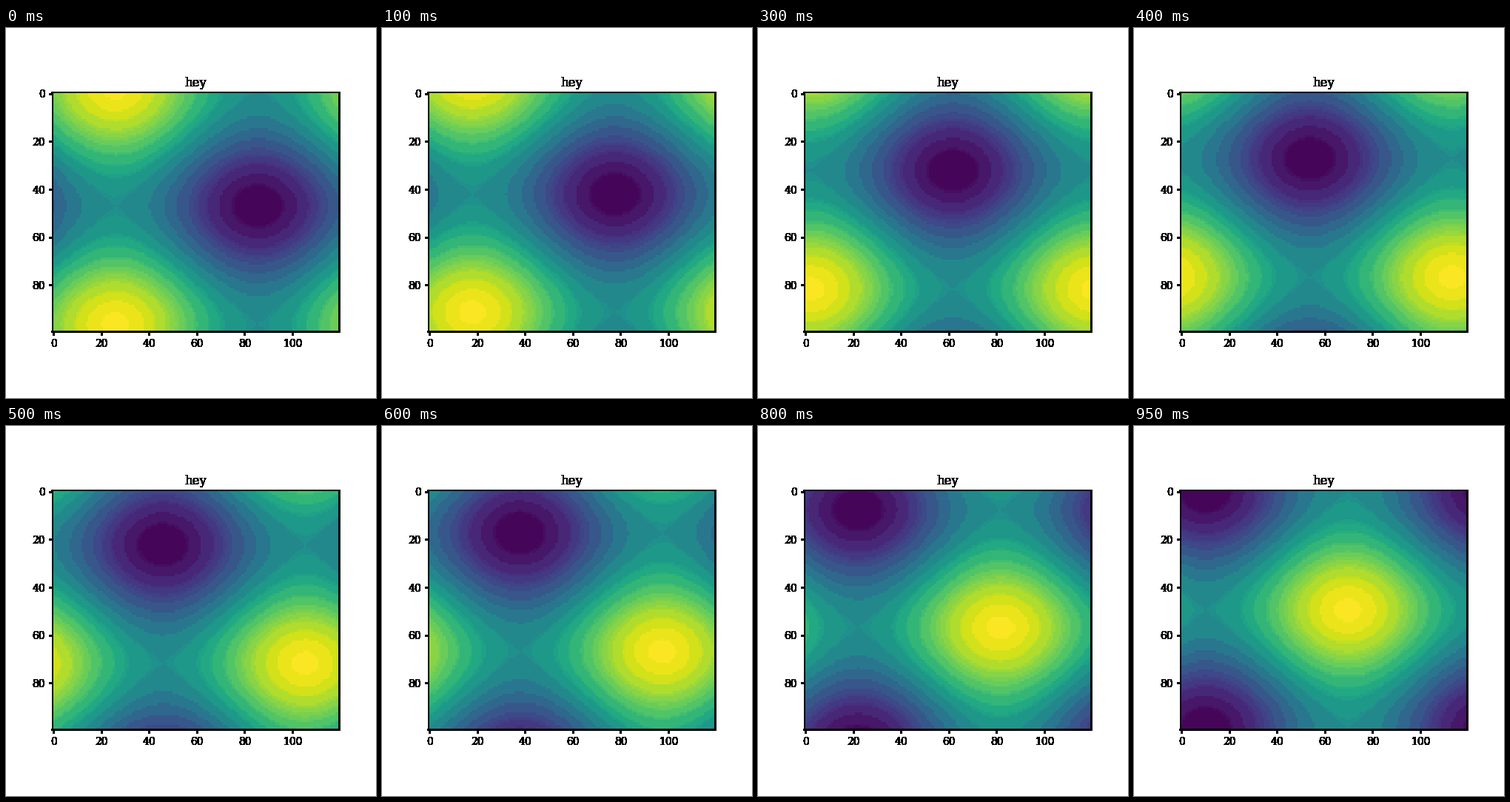
These frames come from a looping animation (500 px wide and 500 px high, 1 s). A matplotlib script:

```python
import matplotlib.pyplot as plt
import numpy as np
from matplotlib.animation import FuncAnimation

FRAMES, INTERVAL = 20, 50
COLS, ROWS = 120, 100
DPI = 100

plt.rcParams.update({"font.family": "DejaVu Serif", "font.size": 10,
                     "text.kerning_factor": 6})

x = np.linspace(0, 2 * np.pi, COLS)
y = np.linspace(0, 2 * np.pi, ROWS)[:, None]

# Group the colormap into coarse RGB cells (3, 4 and 3 bits per channel).
viridis = plt.get_cmap("viridis")(np.arange(256), bytes=True)[:, :3]
_, band = np.unique(viridis >> np.array([5, 4, 5], dtype=np.uint8),
                    axis=0, return_inverse=True)
band = band.ravel()


def wave_image(frame):
    """Travelling wave coloured with the mean colour of each band."""
    step = frame + 1
    z = np.sin(x + step * np.pi / 15) + np.cos(y + step * np.pi / 20)
    level = ((z - z.min()) / np.ptp(z) * 256).astype(int).clip(0, 255)
    count = np.bincount(level.ravel(), minlength=256)
    total = np.maximum(np.bincount(band, count), 1)
    mean = np.stack([np.bincount(band, count * channel) / total
                     for channel in viridis.T], axis=1)
    return mean.astype(np.uint8)[band[level]]


def solid(pixels, dpi):
    """Turn every touched pixel fully black, for hard edges."""
    out = np.zeros_like(pixels)
    out[..., 3] = pixels[..., 3] > 0
    return out, 0, 0


fig, ax = plt.subplots(figsize=(5, 5), dpi=DPI)
fig.subplots_adjust(left=0.125, right=0.9, bottom=0.125, top=0.88)
image = ax.imshow(wave_image(0), interpolation="nearest")
title = ax.set_title("hey", fontsize=12)

for artist in (ax.xaxis, ax.yaxis, title):
    artist.set_agg_filter(solid)
for side, pixels in (("left", 2), ("top", 2), ("right", 3), ("bottom", 3)):
    ax.spines[side].set_linewidth(pixels * 72 / DPI)


def update(frame):
    image.set_data(wave_image(frame))
    return [image]


anim = FuncAnimation(fig, update, frames=FRAMES, interval=INTERVAL,
                     repeat=True, repeat_delay=0, blit=False)
plt.show()
```
